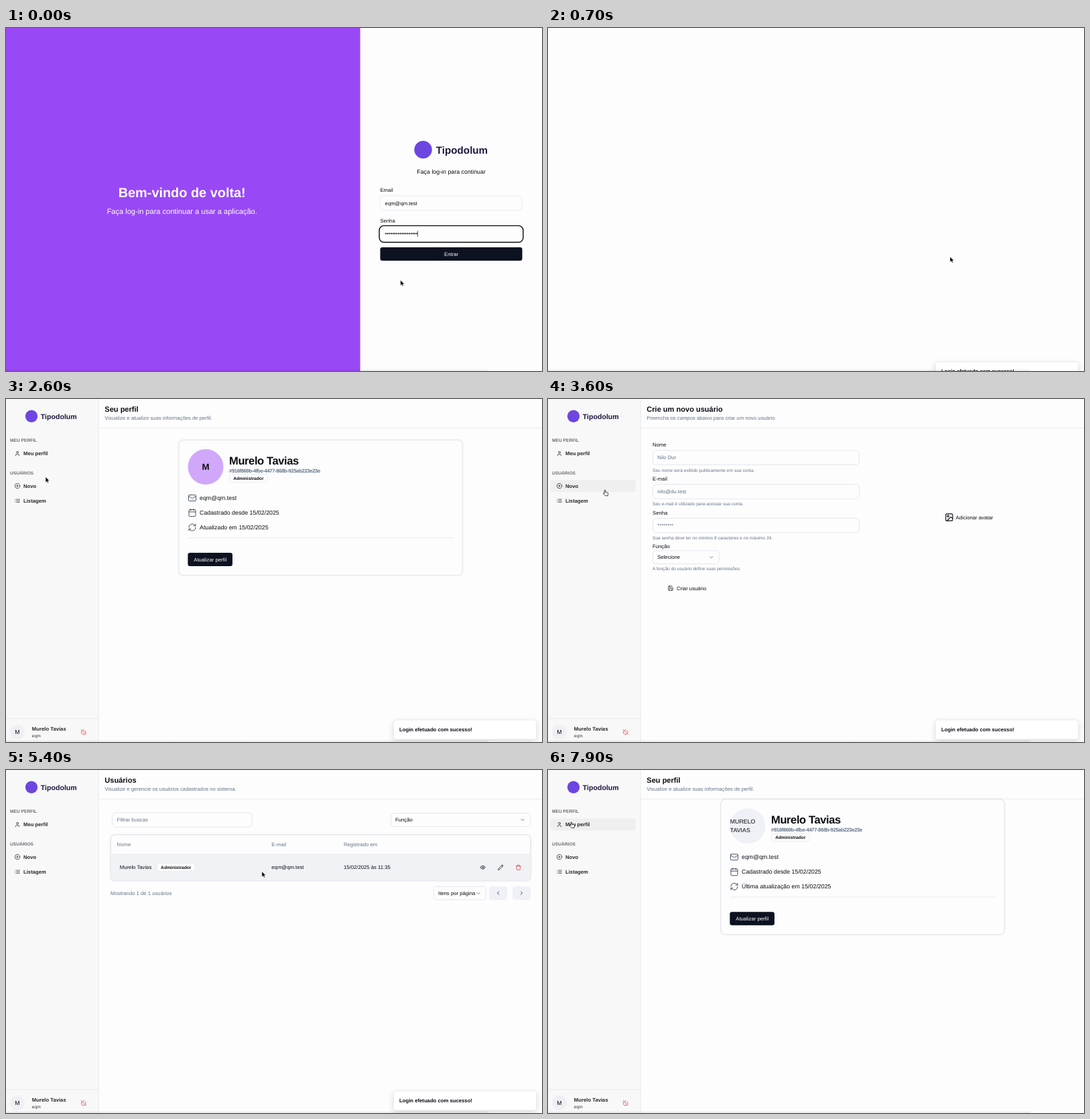
These frames come from a looping animation (800x513 px, 8000 ms). An HTML page:

```html
<!DOCTYPE html>
<html lang="pt-BR">
<head>
<meta charset="utf-8">
<title>Painel de usuários</title>
<style>
  html, body { margin: 0; width: 100%; height: 100%; overflow: hidden; background: #fdfdfd; }
  svg { display: block; width: 100vw; height: 100vh; }
  text { font-family: "Liberation Sans", Arial, sans-serif; text-rendering: geometricPrecision; white-space: pre; }
  .icon { fill: none; stroke-linecap: round; stroke-linejoin: round; }
  .card { filter: drop-shadow(0 .6px .8px #0002); }
  .toast { filter: drop-shadow(0 3px 4px #0002); }
</style>
</head>
<body>
<svg id="stage" viewBox="0 0 800 513"></svg>
<script>
const LOOP = 8000, STEP = 100;
const XS = 6.63, SM = 7.735, BASE = 8.84, XL = 11.05;
const INK = '#0b0d14', SLATE = '#64748b', LINE = '#e3e6ec', DARK = '#0d1220', RED = '#dc3030';
const USER = 'Murelo Tavias', EMAIL = 'eqm@qm.test', LOGIN = 'eqm', BRAND = 'Tipodolum';

const ICONS = {
  user: '<path d="M19 21v-2a4 4 0 0 0-4-4H9a4 4 0 0 0-4 4v2"/><circle cx="12" cy="7" r="4"/>',
  plus: '<circle cx="12" cy="12" r="10"/><path d="M8 12h8M12 8v8"/>',
  list: '<path d="M3 6h.01M3 12h.01M3 18h.01M8 6h13M8 12h13M8 18h13"/>',
  mail: '<rect x="2" y="4" width="20" height="16" rx="2"/><path d="m22 7-9 5.7a2 2 0 0 1-2 0L2 7"/>',
  calendar: '<rect x="3" y="4" width="18" height="18" rx="2"/><path d="M8 2v4M16 2v4M3 10h18"/>',
  refresh: '<path d="M3 12a9 9 0 0 1 15.7-6.3L21 8M21 3v5h-5M21 12a9 9 0 0 1-15.7 6.3L3 16M8 16H3v5"/>',
  powerOff: '<path d="M18.4 6.6A9 9 0 0 1 20.8 15M6.2 6.2a9 9 0 1 0 12.6 12.6M12 2v4M2 2l20 20"/>',
  eye: '<path d="M2 12a10.8 10.8 0 0 1 20 0a10.8 10.8 0 0 1-20 0"/><circle cx="12" cy="12" r="3"/>',
  pencil: '<path d="M21.2 6.8a2.8 2.8 0 0 0-4-4L3.8 16.2 2 22l5.8-1.8zM15 5l4 4"/>',
  trash: '<path d="M3 6h18M19 6v14a2 2 0 0 1-2 2H7a2 2 0 0 1-2-2V6M8 6V4a2 2 0 0 1 2-2h4a2 2 0 0 1 2 2v2"/>',
  down: '<path d="m6 9 6 6 6-6"/>',
  left: '<path d="m15 18-6-6 6-6"/>',
  right: '<path d="m9 18 6-6-6-6"/>',
  save: '<path d="M15 3l6 6v10a2 2 0 0 1-2 2H5a2 2 0 0 1-2-2V5a2 2 0 0 1 2-2zM17 21v-8H7v8M7 3v5h8"/>',
  image: '<rect x="3" y="3" width="18" height="18" rx="2"/><circle cx="9" cy="9" r="2"/><path d="m21 15-3-3a2 2 0 0 0-3 0l-9 9"/>',
  page: '<path d="M5 10h14v11H5zM8 10V6a4 4 0 0 1 8 0v4"/>',
  spinner: '<path d="M21 12a9 9 0 1 1-6.2-8.6"/>'
};

// Shape helpers: text is placed by the vertical middle of its capitals.
const text = (x, y, str, size = SM, fill = INK, extra = '') =>
  `<text x="${x}" y="${y + size * .36}" font-size="${size}" fill="${fill}" ${extra}>${str}</text>`;
const bold = (x, y, str, size = SM, fill = INK, extra = '') =>
  text(x, y, str, size, fill, 'font-weight="700" ' + extra);
const rect = (x, y, w, h, rx, fill, stroke = 'none', extra = '') =>
  `<rect x="${x}" y="${y}" width="${w}" height="${h}" rx="${rx}" fill="${fill}" stroke="${stroke}" stroke-width=".7" ${extra}/>`;
const circle = (x, y, r, fill) => `<circle cx="${x}" cy="${y}" r="${r}" fill="${fill}"/>`;
const line = (x1, y1, x2, y2) => `<path d="M${x1} ${y1}L${x2} ${y2}" stroke="${LINE}" stroke-width=".8"/>`;
const icon = (name, x, y, size = BASE, color = '#222', weight = 2) =>
  `<g class="icon" stroke="${color}" stroke-width="${weight}" transform="translate(${x} ${y}) scale(${size / 24}) translate(-12 -12)">${ICONS[name]}</g>`;
const group = (id, body, extra = '') => `<g id="${id}" ${extra}>${body}</g>`;
const MIDDLE = 'text-anchor="middle"';

const badge = (x, y) => rect(x, y - 6, 57, 12, 3.5, '#fdfdfd', LINE) + bold(x + 5.9, y, 'Administrador', XS);
const header = (title, sub) => bold(147.3, 15.5, title, XL) + text(147.3, 28.5, sub, SM, SLATE);
const brand = (x, y, r, gap, size) => circle(x, y, r, '#6d45e0') + bold(x + r + gap, y + .6, BRAND, size, '#20173f');

function loginPage() {
  const field = (label, y) => text(558.4, y - 19.5, label) + rect(558.6, y - 10.8, 211.8, 21.6, 5.5, '#fdfdfd', LINE);
  return rect(0, 0, 528.6, 513, 0, '#9948f5')
    + bold(262.7, 246, 'Bem-vindo de volta!', 19.9, '#fff', MIDDLE)
    + text(262.7, 273.7, 'Faça log-in para continuar a usar a aplicação.', XL, '#fff', MIDDLE)
    + brand(622.6, 182, 13.2, 6, 15.2)
    + text(664.6, 215.3, 'Faça log-in para continuar', BASE, INK, MIDDLE)
    + field('Email', 261.8) + field('Senha', 308)
    + group('credentials', text(565.6, 261.8, EMAIL) + text(565.6, 307.6, '•'.repeat(18)))
    + group('focus', `<rect x="557.1" y="295.6" width="214.8" height="24.9" rx="7" fill="none" stroke="${INK}" stroke-width="1.4"/>`
      + rect(614.2, 303.6, .7, 8.4, 0, INK))
    + rect(558.5, 328, 212, 20, 3.3, DARK, 'none', 'id="submit"')
    + group('idle', text(664.6, 338, 'Entrar', SM, '#f8fafc', MIDDLE))
    + group('busy', text(662.8, 338, 'Entrar', SM, '#f0f1f3') + group('spin', icon('spinner', 0, 0, BASE, '#f0f1f3')));
}

const ITEMS = [['Meu perfil', 81.6, 'user'], ['Novo', 130, 'plus'], ['Listagem', 152.2, 'list']];

function sidebar() {
  const items = ITEMS.map(([label, y, name], i) =>
    rect(4, y - 9, 127, 18, 4, '#efeff0', 'none', `id="item${i}"`)
    + icon(name, 17, y, BASE, '#27272a') + bold(26, y, label, SM, '#27272a')).join('');
  return rect(0, 0, 138, 513, 0, '#f8f8f8') + line(138.3, 0, 138.3, 513) + line(138, 43.3, 800, 43.3)
    + brand(38, 25.8, 9.2, 4.6, 10.6)
    + bold(6, 61.8, 'MEU PERFIL', XS, '#6d6d74') + bold(6, 110.4, 'USUÁRIOS', XS, '#6d6d74') + items
    + line(0, 478, 138, 478) + circle(17, 498, 11, '#eff0f5')
    + text(17, 498, 'M', BASE, INK, MIDDLE)
    + bold(38.8, 493.6, USER, SM, '#27272a') + text(38.8, 503.6, LOGIN, XS, '#333')
    + icon('powerOff', 115.8, 498, BASE, RED);
}

function profilePage(avatar, updated) {
  const info = (name, y, str) => icon(name, 278, y, 13.3, '#475569', 1.8) + text(289, y, str, BASE);
  return rect(258.2, 61.6, 422.8, 202, 6.5, '#fdfdfd', '#dfe2e8', 'class="card"')
    + avatar
    + bold(333, 91.6, USER, 16.575, INK, 'letter-spacing="-.414"')
    + bold(333, 107, '#916f869b-4fbe-4477-868b-925ab223e23e', SM, SLATE, 'letter-spacing="-.387"')
    + badge(333.3, 118.6)
    + info('mail', 148, EMAIL) + info('calendar', 170, 'Cadastrado desde 15/02/2025') + info('refresh', 192, updated + ' em 15/02/2025')
    + line(271.5, 207.7, 668, 207.7)
    + rect(271.4, 230, 66.6, 20, 3.3, DARK) + text(304.7, 240, 'Atualizar perfil', SM, '#f8fafc', MIDDLE);
}

function formPage() {
  const field = (label, y, hint, note) => text(156, y - 19.2, label)
    + rect(156.3, y - 10.8, 308.4, 21.6, 5.5, '#fdfdfd', '#d9dde5') + text(163.2, y, hint, SM, SLATE)
    + text(156, y + 18.6, note, XS, SLATE);
  return header('Crie um novo usuário', 'Preencha os campos abaixo para criar um novo usuário.')
    + field('Nome', 87.7, 'Nilo Dur', 'Seu nome será exibido publicamente em sua conta.')
    + field('E-mail', 138.4, 'nilo@du.test', 'Seu e-mail é utilizado para acessar sua conta.')
    + field('Senha', 189.1, '********', 'Sua senha deve ter no mínimo 8 caracteres e no máximo 24.')
    + text(156, 220.6, 'Função') + rect(156.3, 226.8, 99, 19.8, 4.5, '#fdfdfd', '#d9dde5')
    + text(163.2, 236.7, 'Selecione') + icon('down', 243.8, 236.8, BASE, '#555')
    + text(156, 254, 'A função do usuário define suas permissões.', XS, SLATE)
    + icon('save', 183, 283, BASE) + text(192, 283, 'Criar usuário')
    + icon('image', 598.8, 177, 13.6, INK) + text(608.5, 177, 'Adicionar avatar');
}

function usersPage() {
  const pager = (x, name) => rect(x, 174, 27, 20.3, 4, '#eff1f6') + icon(name, x + 13.5, 184.2, BASE, INK);
  return header('Usuários', 'Visualize e gerencie os usuários cadastrados no sistema.')
    + rect(158.6, 64, 208.6, 21.2, 5.5, '#fdfdfd', '#d9dde5') + text(165.5, 74.5, 'Filtrar buscas', SM, SLATE)
    + rect(574.3, 64.5, 208.2, 20, 4.5, '#fdfdfd', '#d9dde5') + text(581, 74.5, 'Função') + icon('down', 771, 74.6, BASE, '#555')
    + rect(156.3, 97, 626.6, 68.6, 6, '#fdfdfd', '#d9dde5', 'class="card"')
    + `<path id="row" d="M156.6 126H782.6V159.6a5.6 5.6 0 0 1-5.6 5.6H162.2a5.6 5.6 0 0 1-5.6-5.6z" fill="#f0f2f6"/>`
    + line(156.3, 126, 782.8, 126)
    + text(165.6, 111.4, 'Nome', SM, SLATE) + text(396.3, 111.4, 'E-mail', SM, SLATE) + text(504, 111.4, 'Registrado em', SM, SLATE)
    + text(169.8, 145.6, USER) + badge(225.2, 145.8) + text(396.3, 145.6, EMAIL) + text(504, 145.6, '15/02/2025 às 11:35')
    + icon('eye', 711.7, 145.7, BASE, INK) + icon('pencil', 738.2, 145.7, BASE, INK) + icon('trash', 764.7, 145.7, BASE, RED)
    + text(156, 184.2, 'Mostrando 1 de 1 usuários', SM, SLATE)
    + rect(638.3, 174.3, 78, 19.8, 4.5, '#fdfdfd', '#d9dde5') + text(645, 184.2, 'Itens por página') + icon('down', 705, 184.4, BASE, '#555')
    + pager(721, 'left') + pager(756, 'right');
}

const profileHeader = header('Seu perfil', 'Visualize e atualize suas informações de perfil.');
const initial = circle(298, 101.4, 26.5, '#d0a7f9') + bold(298, 101.4, 'M', 13.26, INK, MIDDLE);
const [first, last] = USER.toUpperCase().split(' ');
const fallback = circle(298, 101.4, 26.5, '#eff1f6') + text(271.7, 94.8, first, BASE) + text(271.7, 108, last, BASE);

document.getElementById('stage').innerHTML =
  `<defs><linearGradient id="fade" x2="0" y2="1"><stop stop-color="#000" stop-opacity="0"/><stop offset="1" stop-color="#000" stop-opacity=".08"/></linearGradient></defs>`
  + rect(0, 0, 800, 513, 0, '#fdfdfd')
  + group('login', loginPage())
  + group('shell', sidebar())
  + group('home', profileHeader + profilePage(initial, 'Atualizado'))
  + group('form', formPage())
  + group('users', usersPage())
  + group('profile', profileHeader + `<g transform="translate(0 -17.7)">${profilePage(fallback, 'Última atualização')}</g>`)
  + group('toast', rect(578.2, 480, 213.4, 29, 3.5, '#fff', '#e2e4e9', 'class="toast"') + bold(587, 494.4, 'Login efetuado com sucesso!'))
  + rect(0, 509.5, 720, 3.5, 0, 'url(#fade)')
  + group('status', rect(2.5, 499.2, 87, 13.4, 6.7, '#141414') + icon('page', 11, 506, 7, '#ccc') + text(17, 506, 'localhost:3001/users', 7.3, '#e4e4e4'))
  + group('cursor', `<path id="arrow" d="M0 0V8.3L1.9 6.6 3.2 9.3 4.6 8.7 3.4 6H6Z" fill="#000" stroke="#fff" stroke-width=".6"/>`
    + `<path id="hand" d="M-.9.8c0-1.2 1.6-1.2 1.6 0v2.4l2.9.6c.8.2 1.1.7 1 1.5L4 8.6H.2l-2.7-3c-.6-.9.4-1.6 1-1l.6.6z" fill="#fff" stroke="#111" stroke-width=".8"/>`);

const byId = id => document.getElementById(id);
const show = (id, on) => byId(id).style.display = on ? '' : 'none';
const between = (v, a, b) => v >= a && v < b;

// Pointer stops: time, x, y.
const PATH = [
  [0, 588.7, 377], [400, 600, 342], [1000, 600, 342], [1400, 638, 300], [1800, 588, 270], [2500, 59, 116.5],
  [2700, 59, 116.5], [2900, 42, 128], [3500, 42, 128], [3900, 318, 180], [4400, 77, 154], [4900, 77, 154],
  [5800, 600, 150], [6400, 640, 159], [6600, 640, 159], [7000, 735, 147], [7300, 640, 142], [7700, 35, 78], [LOOP, 35, 78]
];

function pointer(t) {
  const i = PATH.findIndex(stop => stop[0] > t);
  const [t0, x0, y0] = PATH[i - 1], [t1, x1, y1] = PATH[i];
  const p = (t - t0) / (t1 - t0), e = p * p * (3 - 2 * p);
  return [x0 + (x1 - x0) * e, y0 + (y1 - y0) * e];
}

function render(t) {
  const [x, y] = pointer(t), busy = t >= 400;
  show('login', t < 700);
  show('shell', t >= 800);
  show('home', between(t, 800, 3200));
  show('form', between(t, 3200, 4900));
  show('users', between(t, 4900, 7800));
  show('profile', t >= 7800);

  show('focus', !busy);
  show('idle', !busy);
  show('busy', busy);
  byId('credentials').setAttribute('opacity', busy ? .55 : 1);
  byId('submit').setAttribute('fill', busy ? '#787c86' : DARK);
  byId('spin').setAttribute('transform', `translate(649.6 338) rotate(${(t - 600) * .36})`);

  const rise = 19.3 * Math.max(0, 1 - (t - 700) / 100), leave = Math.max(0, t - 5600) / 150;
  show('toast', t >= 700 && leave < 1);
  byId('toast').setAttribute('transform', `translate(${222 * leave} ${rise})`);
  show('status', between(t, 4400, 5100));

  let link = false;
  ITEMS.forEach(([, mid], i) => {
    const over = t >= 800 && between(x, 4, 131) && Math.abs(y - mid) < 9;
    show('item' + i, over);
    link = link || over;
  });
  show('row', between(x, 156, 783) && between(y, 126, 165.5));
  show('hand', link);
  show('arrow', !link);
  byId('cursor').setAttribute('transform', `translate(${x} ${y})`);
}

const start = performance.now();
function tick() {
  const t = (performance.now() - start) % LOOP;
  render(Math.floor(t / STEP) * STEP);
  requestAnimationFrame(tick);
}
tick();
</script>
</body>
</html>
```
